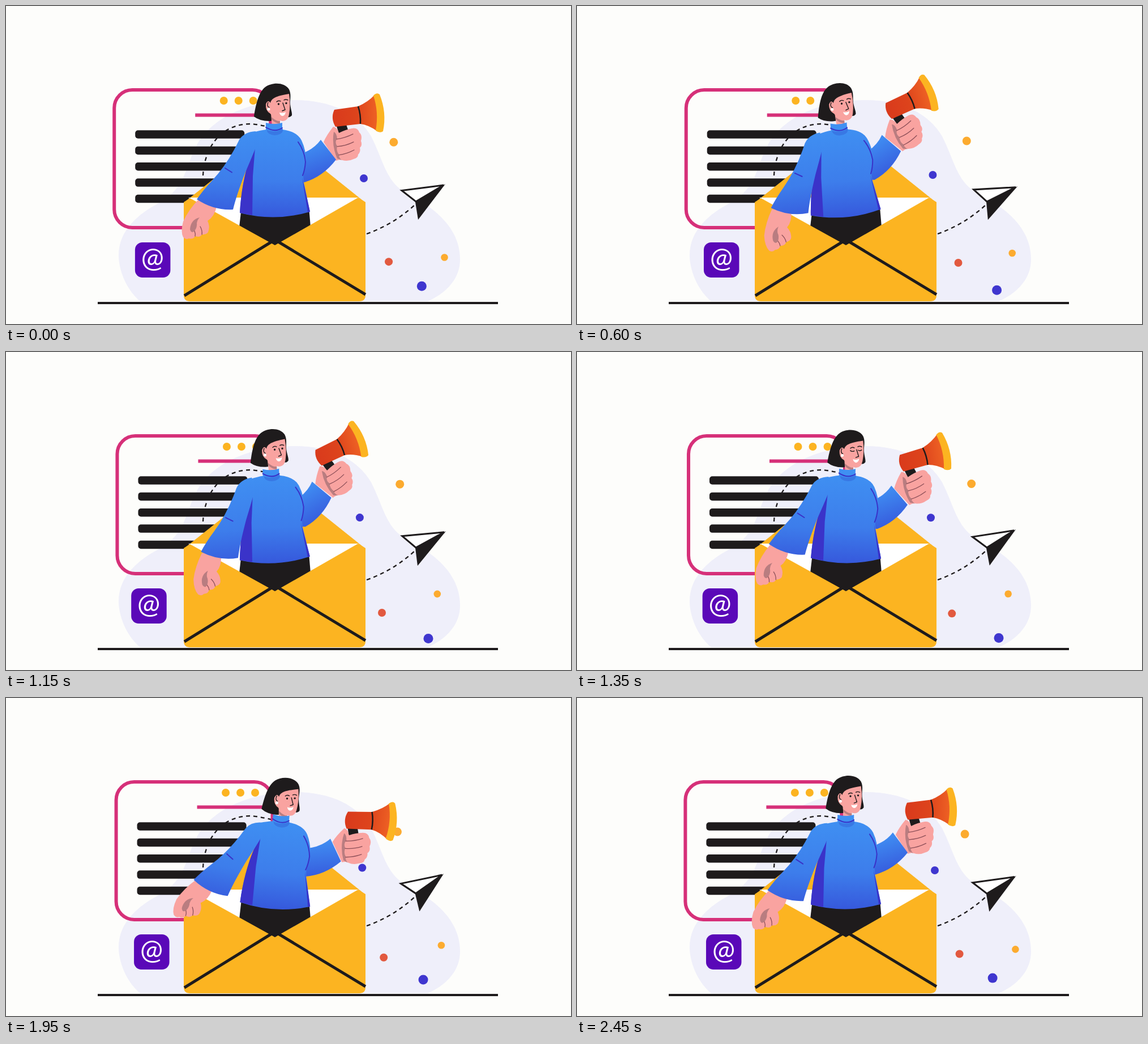
Animation, 998 px wide and 561 px high, one loop 2.5 s. Source, as an HTML page:

```html
<!DOCTYPE html>
<html lang="en">
<head>
<meta charset="utf-8">
<title>Newsletter announcement</title>
<style>
  html, body { margin: 0; width: 100%; height: 100%; overflow: hidden; background: #fdfdfb; }
  svg { display: block; width: 998px; height: 561px; }
  .ink { fill: #1e1b1c; }
  .line { fill: none; stroke: #1e1b1c; }
  .yellow { fill: #fcb421; }
  .skin { fill: #f9a3a0; }
  .shade { fill: #b97d80; }
  .crease { fill: none; stroke: #8c4f58; stroke-width: 1.3; stroke-linecap: round; }
  .seam { fill: none; stroke: #3a32c8; stroke-width: 2; stroke-linecap: round; }
  .wool { fill: url(#wool); }
  .face { fill: none; stroke: #1e1b1c; stroke-width: 1.4; stroke-linecap: round; stroke-linejoin: round; }
</style>
</head>
<body>
<svg viewBox="0 0 998 561">
  <defs>
    <linearGradient id="wool" gradientUnits="userSpaceOnUse" x1="0" y1="215" x2="0" y2="372">
      <stop offset="0" stop-color="#3f90f2"/><stop offset=".6" stop-color="#3d7deb"/><stop offset="1" stop-color="#3659dc"/>
    </linearGradient>
    <linearGradient id="sleeve" gradientUnits="userSpaceOnUse" x1="545" y1="245" x2="565" y2="305">
      <stop offset="0" stop-color="#3f8bf1"/><stop offset="1" stop-color="#3659dc"/>
    </linearGradient>
    <linearGradient id="horn" gradientUnits="userSpaceOnUse" x1="577" y1="0" x2="660" y2="0">
      <stop offset="0" stop-color="#d93a1c"/><stop offset=".5" stop-color="#dd431c"/><stop offset="1" stop-color="#ef6425"/>
    </linearGradient>
  </defs>

  <path fill="#efeffa" d="M237 521C212 500 199 465 199 440C199 395 235 365 275 345C320 318 318 275 340 240C375 185 450 166 510 166C575 166 622 190 645 230C668 275 670 310 710 332C755 355 802 390 802 447C802 480 780 505 745 521Z"/>
  <path class="line" stroke-width="2.3" stroke-dasharray="7 6" d="M348 299C350 255 375 208 433 208Q448 209 475 216M637 402Q685 385 723 350"/>

  <g id="card">
    <rect x="191" y="148" width="276" height="243" rx="32" fill="none" stroke="#d63079" stroke-width="6"/>
    <path stroke="#d63079" stroke-width="6" d="M334 192.500H467"/>
    <g id="cardDots" class="yellow"></g>
    <g id="cardLines" class="ink"></g>
  </g>

  <g id="badge">
    <rect x="228" y="417" width="62.500" height="62" rx="13" fill="#5a08b8"/>
    <text x="259" y="461" text-anchor="middle" font-family="Lato, sans-serif" font-size="48" fill="#fff">@</text>
  </g>

  <g id="confetti"></g>

  <g id="plane">
    <path d="M773 316L699 325.500L724 345Z" fill="#fff" stroke="#1e1b1c" stroke-width="3"/>
    <path class="ink" d="M776 314L723 346L728 377Z"/>
  </g>

  <path class="yellow" d="M314 347L465 227Q475 220 485 227L635 347Z"/>
  <path fill="#fff" d="M322 338H624L475 424Z"/>
  <path class="ink" d="M416 355L412 390L475 424L538 390L535 355Z"/>
  <path class="yellow" d="M314 346L325 339L475 422L622 338L635 346V510Q635 521 624 521H325Q314 521 314 510Z"/>
  <path class="line" stroke-width="5" d="M315 511L469 416M481 416L635 509"/>
  <path class="line" stroke-width="4" d="M162 524H869"/>

  <g id="body">
    <g id="forearm">
      <g id="speaker">
        <path class="ink" d="M584 212L601 209L606 224L588 225Z"/>
        <path fill="url(#horn)" d="M580 183L622 177Q640 169 651 157Q661 190 656 221Q641 210 626 208L582 213Q573 198 580 183Z"/>
        <path class="yellow" d="M649 158Q655 152 660 156Q673 188 666 221Q661 225 653 220Q659 188 649 158Z"/>
        <path class="line" stroke-width="2.500" d="M622 177Q627 192 626 208"/>
        <path class="skin" d="M578 213Q566 228 561 240L583 273Q590 270 594 272Q604 275 614 270Q622 268 622 262Q627 257 625 250Q630 246 627 238Q630 228 624 223Q621 214 611 216Q600 218 588 224Q585 214 578 213Z"/>
        <path class="shade" d="M579 222Q584 224 585 234Q580 240 585 247Q583 256 588 262Q588 268 593 272L585 269Q575 246 579 222Z"/>
        <path class="crease" d="M584 235Q599 233 613 226M585 248Q600 247 614 240M588 263Q602 261 615 254"/>
      </g>
      <path fill="url(#sleeve)" d="M556 236L583 271Q560 301 527 311L515 308L518 262Q543 254 556 236Z"/>
    </g>

    <path class="wool" d="M436 223Q450 219 460 218H488Q514 221 522 237Q532 258 529 280Q522 300 528 320L537 363Q475 381 413 365Q416 310 432 270Z"/>
    <path fill="#3a33c9" d="M440 250L436 300L435 369L413 365Q416 312 430 270ZM523 302L537 363L533 364Z"/>
    <path class="seam" d="M516 240Q527 255 529 275Q528 289 524 299"/>
    <ellipse cx="475" cy="219" rx="14" ry="9" fill="#3878e4"/>

    <g id="arm">
      <g id="hand">
        <path class="skin" d="M341 340Q322 360 313 380Q308 398 313 408Q318 413 323 410Q331 412 334 406Q343 409 346 403Q357 404 358 395Q360 388 356 379Q368 372 372 354Z"/>
        <path class="shade" d="M342 373Q326 377 325 394Q327 402 333 397Q338 390 337 383Q338 377 342 373Z"/>
        <path class="crease" d="M333 397Q335 402 334 406M343 389Q347 396 346 403"/>
      </g>
      <path class="wool" d="M441 221Q421 222 412 236Q392 278 364 308Q348 325 337 341Q367 361 401 359Q407 334 423 293Q433 270 441 250Z"/>
      <path class="seam" d="M387 286L399 293.500"/>
    </g>

    <g id="head">
      <path class="ink" d="M438 195C441 175 446 152 458 143C470 134 492 134 500 147C504 155 502 163 502 170C502 180 506 188 505 193Q502 197 498 196L488 201L465 203Q448 203 438 195Z"/>
      <path class="skin" d="M468 190L470 213L484 212V198Z"/>
      <path class="shade" d="M469 196Q478 204 484 203V208Q474 206 469 200Z"/>
      <path class="skin" d="M467 171C469 163 476 159 500 155C502 168 502 180 500 191Q498 203 488 203Q474 201 467 190Q458 185 459 173Q463 164 467 171Z"/>
      <path class="face" d="M465 179Q460 177 463 170M478 169Q481 166 485 168M491 166Q494 164 498 166M489 171L493 183L488 185"/>
      <g id="eyesOpen" class="ink"><circle cx="481.500" cy="173" r="1.700"/><circle cx="495" cy="171.500" r="1.700"/></g>
      <path id="eyesShut" class="face" d="M478 173Q481 175.500 485 173.500M492 172Q495 174 498 171.500"/>
      <path fill="#fff" d="M483 188Q489 190 494 187Q493 194 488 194Q484 193 483 188Z"/>
      <circle cx="464" cy="182" r="2.500" fill="#fff"/>
    </g>
    <path class="wool" d="M459 206Q474 210 488 206V217Q475 225 459 218Z"/>
    <path class="seam" stroke-width="1.800" d="M459 214Q475 224 488 215"/>
  </g>
</svg>

<script>
const LOOP = 2500;
const el = id => document.getElementById(id);
const circle = (x, y, r, fill) => `<circle cx="${x}" cy="${y}" r="${r}"${fill ? ` fill="${fill}"` : ''}/>`;

el('cardDots').innerHTML = [384.5, 410.5, 436.5].map(x => circle(x, 167, 7)).join('');
el('cardLines').innerHTML = [0, 1, 2, 3, 4]
  .map(i => `<rect x="228" y="${219.3 + i * 28.35}" width="193" height="14.500" rx="5"/>`).join('');

// x, y, radius, colour, drift x, drift y, time of the farthest point
const confetti = [
  [684.5, 240.5, 7.5, '#fcab2f', 12.2, -8, 1380],
  [632, 304, 7, '#3f36cf', -7.2, -12, 1230],
  [677, 450.5, 7, '#e2593f', -15, 11, 1450],
  [774.5, 443.5, 6.3, '#fcab2f', -13, -17, 1270],
  [734, 494, 8.5, '#3f36cf', 12, 11.5, 1120]
];
el('confetti').innerHTML = confetti.map(([x, y, r, fill]) => circle(x, y, r, fill)).join('');
const drifters = [...el('confetti').children];

// 0 to 1 and back once per loop, reaching 1 at the given time
const wave = (t, peak) => (1 + Math.cos(2 * Math.PI * (t - peak) / LOOP)) / 2;

// Smooth periodic curve through one value per key time
const keys = [0, 350, 900, 1100, 1350, 1700, 2200];
const n = keys.length;
const keyTime = i => keys[(i + n) % n] + Math.floor(i / n) * LOOP;
function track(...values) {
  const value = i => values[(i + n) % n];
  const slope = i => (value(i + 1) - value(i - 1)) / (keyTime(i + 1) - keyTime(i - 1));
  return t => {
    const i = keys.findLastIndex(k => k <= t);
    const span = keyTime(i + 1) - keyTime(i), s = (t - keyTime(i)) / span, r = 1 - s;
    return r * r * (1 + 2 * s) * value(i) + s * s * (3 - 2 * s) * value(i + 1)
      + s * r * span * (r * slope(i) - s * slope(i + 1));
  };
}
const lean = track(0, -2.9, -4.7, -2.8, 1.4, 5.3, 2.7);
const armAngle = track(0, -5.5, -9.5, -7.8, 0.7, 10.8, 6.1);
const handAngle = track(0, -7, -14, -12, -5, 0, 0);
const forearmAngle = track(0, -7.4, -16, -14.5, -2.8, 12.4, 9.1);
const speakerAngle = track(0, -12, -22, -20, -9, 9, 5);

const move = (node, x, y) => node.setAttribute('transform', `translate(${x} ${y})`);
const turn = (id, angle, x, y) => el(id).setAttribute('transform', `rotate(${angle} ${x} ${y})`);

function draw(now) {
  const t = now % LOOP;
  const tilt = lean(t), elbow = forearmAngle(t);

  move(el('card'), 6 * wave(t, 1400), 0);
  move(el('badge'), -6.8 * wave(t, 1150), 0);
  confetti.forEach(([, , , , dx, dy, peak], i) => {
    const w = wave(t, peak);
    move(drifters[i], dx * w, dy * w);
  });
  turn('plane', -tilt, 722, 347);

  turn('body', tilt, 475, 368);
  move(el('head'), 0, 0.45 * tilt + 0.06 * tilt * tilt);
  turn('arm', armAngle(t) - tilt, 430, 240);
  turn('hand', handAngle(t), 357, 355);
  turn('forearm', elbow - tilt, 525, 290);
  turn('speaker', speakerAngle(t) - elbow, 572, 243);

  const blink = Math.abs(t - 1350) < 80;
  el('eyesOpen').style.opacity = blink ? 0 : 1;
  el('eyesShut').style.opacity = blink ? 1 : 0;
  requestAnimationFrame(draw);
}
draw(performance.now());
</script>
</body>
</html>
```
